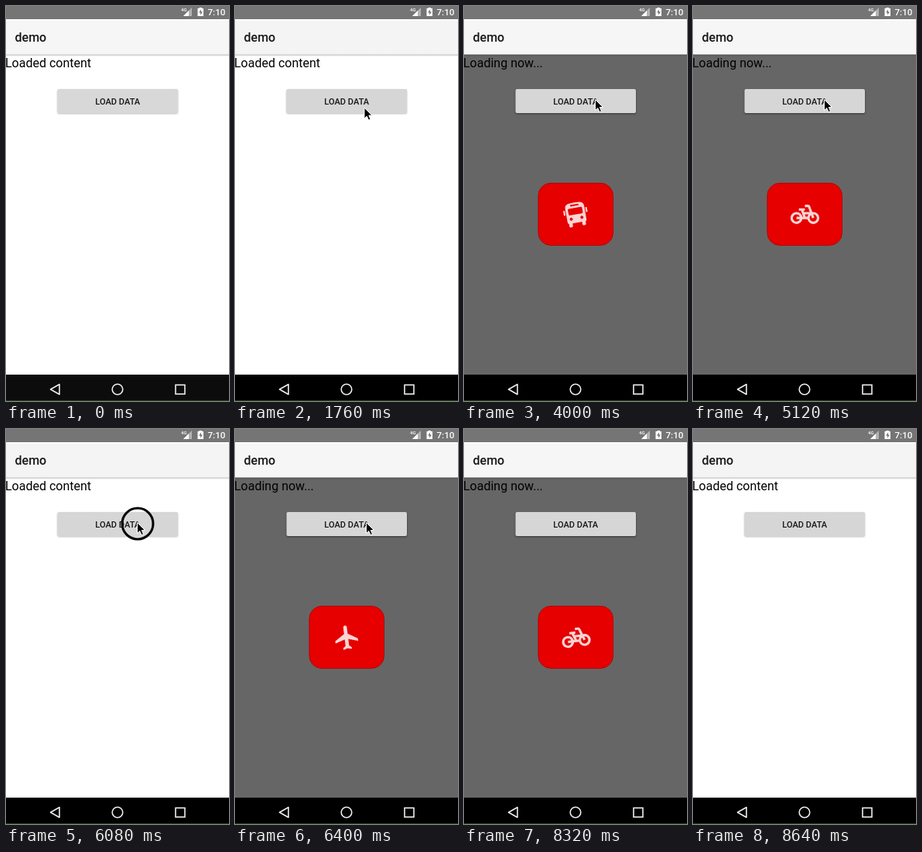
Recreate the animation shown at these times as an HTML page. Size 288 px wide and 509 px high, loop 9.28 s.

```html
<!DOCTYPE html>
<html lang="en">
<head>
<meta charset="utf-8">
<title>Loading demo</title>
<style>
  html, body { margin: 0; width: 100%; height: 100%; overflow: hidden; background: #fff; }
  svg { display: block; width: 288px; height: 509px; font: 16px Roboto, sans-serif; }
  .medium { font-weight: 500; }
</style>
</head>
<body>
<svg viewBox="0 0 288 509">
  <defs>
    <linearGradient id="shade" x2="0" y2="1">
      <stop stop-color="#000" stop-opacity=".3"/>
      <stop offset="1" stop-color="#000" stop-opacity="0"/>
    </linearGradient>
    <filter id="soft"><feGaussianBlur stdDeviation=".8"/></filter>
  </defs>

  <rect id="page" y="62" width="288" height="413"/>
  <rect y="62" width="288" height="3" fill="url(#shade)"/>
  <rect id="toolbar" y="17" width="288" height="45.5"/>
  <rect y="17" width="288" height="1.5" fill="#fff"/>
  <text class="medium" x="11.5" y="46" fill="#161616">demo</text>
  <text id="label" x="-1" y="79"></text>

  <rect id="buttonShadow" x="66.5" y="108" width="155.5" height="31" rx="2" filter="url(#soft)"/>
  <rect id="button" x="66.5" y="107" width="155.5" height="31" rx="2"/>
  <text class="medium" x="144.2" y="127" font-size="11.1" text-anchor="middle" fill="#161616">LOAD DATA</text>

  <rect width="288" height="17" fill="#757575"/>
  <g fill="#fff">
    <text class="medium" x="226" y="7" font-size="6">4G</text>
    <path d="M229 13 240 2V13z" fill-opacity=".45"/>
    <path d="M229 13 236 6V13z"/>
    <path d="M247.5 3h2V2h3.500v1h2v10h-7.500z"/>
    <path d="M252 4.500 249 8.500h2v3l3-4h-2z" fill="#757575"/>
    <text class="medium" x="260.500" y="12" font-size="11.6">7:10</text>
  </g>

  <rect id="nav" y="475" width="288" height="34"/>
  <rect y="508" width="288" height="1" fill="#1c4212"/>
  <g fill="none" stroke="#eee" stroke-width="1.6">
    <path d="M57.500 494 69 487.500v13z" stroke-linejoin="round"/>
    <circle cx="144" cy="494" r="6.8"/>
    <rect x="219" y="488.300" width="12" height="11.700"/>
  </g>

  <g id="loader">
    <rect x="96" y="228.300" width="96.500" height="80" rx="16" fill="#e60000" stroke="#b50000"/>
    <path id="icon" fill="#fff" fill-opacity=".83" fill-rule="evenodd"/>
  </g>

  <circle id="ring" cx="170" cy="122" r="20" fill="none" stroke="#000" stroke-width="3"/>
  <path id="cursor" d="M0 0V14L3.300 11 5.500 16 8 15 5.800 10H10z" stroke="#fff" stroke-width="1"/>
</svg>

<script>
const LOOP = 9280, STEP = 160, LOAD_TIME = 2400, ICON_TIME = 800;
const clicks = [2720, 6080];
const cursorPath = [[1760, 167, 131], [1920, 167, 126], [2080, 167, 122], [2400, 169.5, 120.5]];
const CURSOR_HIDES = 7200;

const plane = 'M21 16v-2l-8-5V3.5C13 2.7 12.3 2 11.5 2S10 2.700 10 3.500V9l-8 5v2l8-2.500V19l-2 1.500V22l3.500-1 3.500 1v-1.500L13 19v-5.500z';
const bus = 'M4 6C4 2 8 2 12 2s8 0 8 4v11q0 2-1 2v2q0 1-1 1h-1q-1 0-1-1v-2H8v2q0 1-1 1H6q-1 0-1-1v-2q-1 0-1-2z' +
  'M8.500 3.600v1.200h7V3.600zM7 6.500q-1 0-1 1V11q0 1 1 1h10q1 0 1-1V7.500q0-1-1-1z' +
  'M7.500 14a1.300 1.300 0 1 0 .01 0zM16.500 14a1.300 1.300 0 1 0 .01 0z' +
  'M2 7.500h1.400v4H2zM20.600 7.500H22v4h-1.400z';
const bike = 'M18.180 10l-1.700-4.680C16.200 4.500 15.400 4 14.600 4H12v2h2.600l1.460 4h-4.810l-.36-1H12V7H7v2h1.750l1.820 5H9.900' +
  'A5 5 0 1 0 9.900 16h4.200A5 5 0 1 0 19 10z' +
  'M7.820 16A3 3 0 1 1 7.820 14H5v2zM14.100 14h-1.400l-.73-2H15q-.7.900-.9 2z' +
  'M19 18a3 3 0 0 1-1.950-5.280l.96 2.640 1.880-.68L18.920 12A3 3 0 0 1 19 18z';
const icons = [plane, bus, bike];

const el = id => document.getElementById(id);
const set = (id, name, value) => el(id).setAttribute(name, value);
const show = (id, visible) => set(id, 'visibility', visible ? 'visible' : 'hidden');

function draw(t) {
  const start = clicks.map(c => c + STEP).find(s => t >= s && t < s + LOAD_TIME);
  const loading = start !== undefined;
  const first = t < STEP;

  set('page', 'fill', loading ? '#666' : '#fff');
  set('toolbar', 'fill', loading || first ? '#f6f6f6' : '#f4f4f4');
  set('button', 'fill', first ? '#d8d8d8' : '#d6d6d6');
  set('buttonShadow', 'fill', loading ? '#333' : '#bbb');
  set('nav', 'fill', first ? '#0c0c0c' : '#000');
  el('label').textContent = loading ? 'Loading now...' : 'Loaded content';

  show('loader', loading);
  if (loading) {
    const age = t - start, local = age % ICON_TIME;
    const angle = -10 * Math.sin(Math.PI * local / 640);
    set('icon', 'd', icons[Math.floor(age / ICON_TIME)]);
    set('icon', 'transform', `translate(144.5 268.5) rotate(${angle}) scale(1.55) translate(-12 -12)`);
  }

  show('ring', clicks.some(c => t >= c && t < c + STEP));
  const spot = cursorPath.filter(p => t >= p[0]).pop();
  show('cursor', spot && t < CURSOR_HIDES);
  if (spot) set('cursor', 'transform', `translate(${spot[1]} ${spot[2]})`);
}

const began = performance.now();
function tick() {
  const t = (performance.now() - began) % LOOP;
  draw(Math.floor(t / STEP) * STEP);
  requestAnimationFrame(tick);
}
tick();
</script>
</body>
</html>
```
